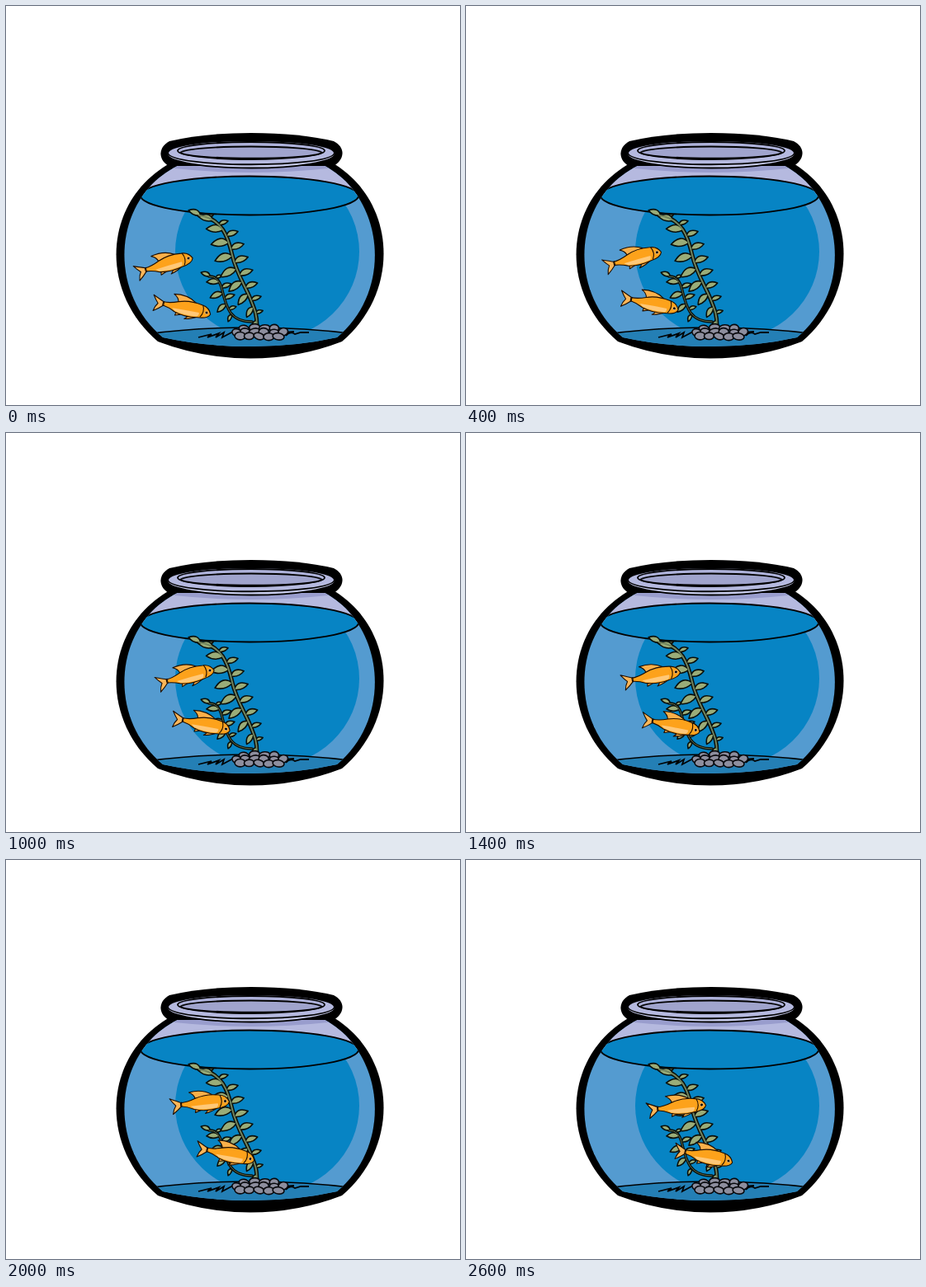
Animation of 550 by 484 pixels, one loop 2800 ms. Source, as an HTML page:

```html
<!DOCTYPE html>
<html lang="en">
<head>
<meta charset="utf-8">
<title>Fish bowl</title>
<style>
  html, body { margin: 0; width: 100%; height: 100%; overflow: hidden; background: #fff; }
  svg { display: block; width: 550px; height: 484px; }
  .line { fill: none; stroke: #000; stroke-width: 1.8; }
  .stem { fill: none; stroke-linecap: round; }
  #leaves { fill: #9aac78; stroke: #0a0f0a; stroke-width: 1.6; stroke-linejoin: round; }
  #pebbles { fill: #8d8e9e; stroke: #08080c; stroke-width: 1.6; }
  #fish { stroke: #1c0d00; stroke-width: 1.1; stroke-linejoin: round; }
</style>
</head>
<body>
<svg viewBox="0 0 550 484">
  <defs>
    <clipPath id="glass">
      <path d="M208 194C130 232 121 345 190 402Q240 413 296 413Q352 413 401 402C470 345 458 232 386 194Z"/>
    </clipPath>
    <path id="main" d="M234 254C262 258 269 280 274 302S290 340 296 355S304 375 304 388"/>
    <path id="side" d="M246 328Q258 327 262 345T272 372Q280 383 298 383"/>
    <g id="fish">
      <path fill="#fbb04a" d="M-36-6Q-37-11-43-14Q-27-17-15-9Z"/>
      <path fill="#fbb04a" d="M-10 7Q-15 11-25 13Q-21 10-22 7ZM-28 8L-37 11L-36 6Z"/>
      <path fill="#fcb659" d="M-53-2Q-58-4-67-8Q-63-2-60 1Q-63 5-64 11Q-58 7-53 2Z"/>
      <path fill="#fda21b" d="M5 1Q2-7-7-8Q-23-11-36-6Q-46-2-54-2V2Q-46 3-38 7Q-25 11-10 8Q3 7 5 1Z"/>
      <path fill="#ffc878" stroke="none" d="M-42 3Q-24 2-9 2Q-8 5-11 7Q-26 9-38 6Z"/>
      <path fill="none" d="M-6-8Q-2 0-7 7M-53-3V3"/>
      <circle r="1.9" fill="#000" stroke="#f8c98a" stroke-width=".8"/>
    </g>
  </defs>

  <path d="M200 190C118 235 111 345 184 407Q238 427.500 296 427.500Q354 427.500 407 407C480 345 472 235 395 190Z"/>
  <path d="M201 196C184 189 183 172 198 164Q240 154 297 154Q356 154 397 164C412 172 411 187 394 196Z"/>

  <g clip-path="url(#glass)">
    <path fill="#549bd0" d="M130 180H460V420H130Z"/>
    <ellipse cx="316.500" cy="298" rx="111.500" ry="107" fill="#0784c4"/>
    <path fill="#b5b9df" d="M130 180H460V231H130Z"/>
    <path fill="#999dcd" d="M204 190H390V197Q297 207 204 197Z"/>
    <ellipse class="line" cx="295" cy="230" rx="132" ry="23.500" style="fill:#0784c4"/>
    <path fill="#247fb5" stroke="#000" stroke-width="1.500" d="M170 398Q230 390 296 390T425 398V430H170Z"/>
  </g>

  <ellipse class="line" cx="297" cy="179.500" rx="101.500" ry="17" style="fill:#c6caea"/>
  <path class="line" style="fill:#b5b9df" d="M196 178C198 197 396 197 398 178C394 158 200 158 196 178Z"/>
  <ellipse class="line" cx="297" cy="175.500" rx="89" ry="10.500" style="fill:#aeb2da"/>
  <path class="line" style="fill:#a0a4cd" d="M211 178C222 168 372 168 383 178C365 187 229 187 211 178Z"/>

  <path class="line" d="M233 402L249 398L244 402L258 397L254 402L264 396L262 402L275 395M337 396L349 395M339 400Q344 394 350 398L357 396H367"/>
  <g class="stem" stroke="#0a0f0a">
    <use href="#side" stroke-width="3.400"/>
    <use href="#main" stroke-width="5"/>
  </g>
  <g id="leaves"></g>
  <g class="stem" stroke="#71845e">
    <use href="#side" stroke-width=".8"/>
    <use href="#main" stroke-width="2"/>
  </g>
  <g id="pebbles"></g>

  <use id="upper" href="#fish"/>
  <use id="lower" href="#fish"/>
</svg>
<script>
const $ = id => document.getElementById(id);
const range = n => [...Array(n).keys()];

// Leaves alternate along a stem; those on the left droop more and more towards the root.
function growLeaves(stem, count, reach, size) {
  const length = stem.getTotalLength() * reach;
  return range(count).map(i => {
    const t = (i + .2) / count, left = i % 2 === 0;
    const { x, y } = stem.getPointAtLength(t * length);
    const long = size * (left ? 22 * Math.sin(Math.PI * (.25 + .6 * t))
                              : 18 * Math.sin(Math.PI * (.1 + .8 * t)));
    const angle = left ? 205 - 95 * t : -22;
    const bulge = left ? 1 : -1;
    return `<path transform="translate(${x} ${y}) rotate(${angle})"
      d="M0 0Q${long * .4} ${long * .55 * bulge} ${long} 0Q${long * .5} ${-long * .3 * bulge} 0 0"/>`;
  }).join('');
}
$('leaves').innerHTML = growLeaves($('side'), 9, .75, .75) + growLeaves($('main'), 19, 1, 1);

// Three rows of slightly irregular pebbles
let seed = 7;
const jitter = amount => {
  seed = seed * 16807 % 2147483647;
  return (seed / 2147483647 - .5) * amount;
};
$('pebbles').innerHTML = [4, 6, 5].map((count, row) => range(count).map(i => {
  const x = 307 + (i - (count - 1) / 2) * 11.5 + jitter(3);
  const y = 390.5 + row * 5 + jitter(2);
  return `<ellipse rx="${6.3 + jitter(1.5)}" ry="${4.3 + jitter(1)}"
    transform="translate(${x} ${y}) rotate(${jitter(40)})"/>`;
}).join('')).join('');

// Each pose: step, eye x, eye y, tilt in degrees
const swims = {
  upper: [[0, 221, 306, -15], [5, 247, 288, -14], [10, 265.5, 292.5, -4.5], [13, 285.5, 297, -5]],
  lower: [[0, 243, 372, 12], [5, 266.5, 359, 12], [10, 296, 362.5, 12], [13, 318, 365, 12]]
};
const STEP = 200, STEPS = 14;

function poseAt(keys, step) {
  const next = Math.max(1, keys.findIndex(key => key[0] >= step));
  const a = keys[next - 1], b = keys[next];
  const k = (step - a[0]) / (b[0] - a[0]);
  return a.map((v, i) => v + (b[i] - v) * k);
}

function draw() {
  const step = Math.floor(performance.now() / STEP) % STEPS;
  for (const id in swims) {
    const [, x, y, tilt] = poseAt(swims[id], step);
    $(id).setAttribute('transform', `translate(${x} ${y}) rotate(${tilt})`);
  }
  requestAnimationFrame(draw);
}
draw();
</script>
</body>
</html>
```
